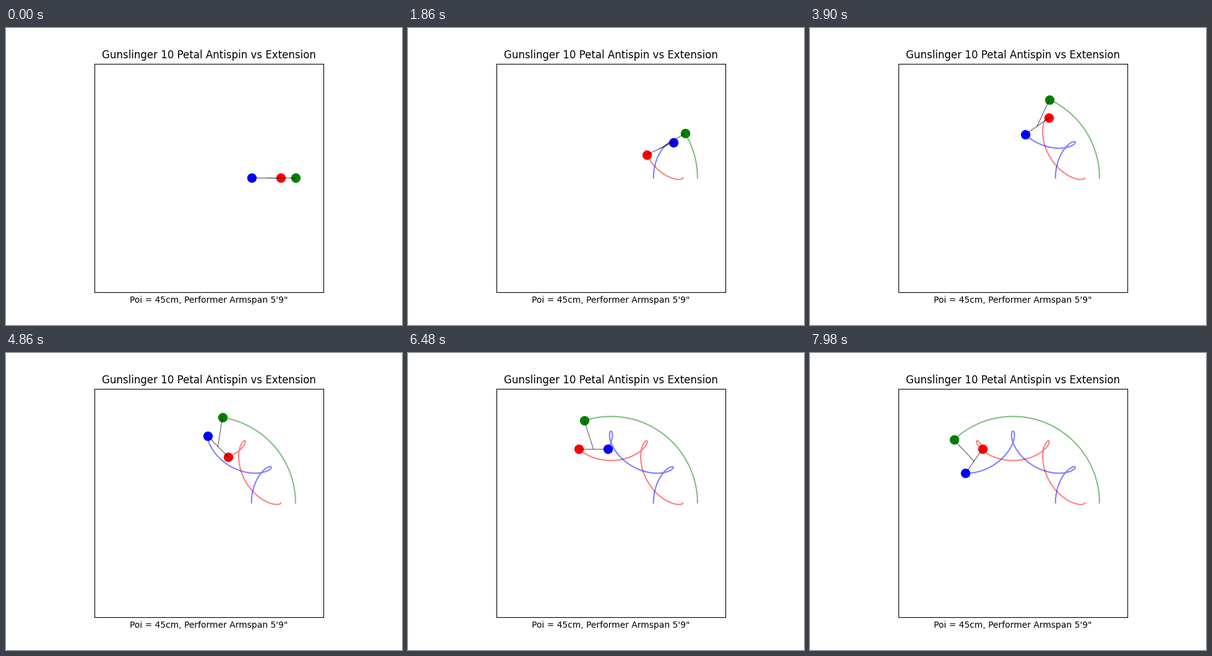
Recreate the animation shown at these times as a matplotlib script. Size 640 px wide and 480 px high, loop 8000 ms.

```python
import numpy as np
import matplotlib.pyplot as plt
from matplotlib.animation import FuncAnimation

ARM = 175.26 / 2     # cm, half of the armspan
POI = 45.0           # cm
SPIN = -5            # turns of the gunslinger poi per turn of the hand
TICK = 20            # ms
HOLD = 3             # ticks per degree of hand travel
LOOP = 8000          # ms

plt.rcParams["font.family"] = "DejaVu Sans"


def polar(radius, angle):
    return radius * np.array([np.cos(angle), np.sin(angle)])


angle = np.radians(np.arange(LOOP // (TICK * HOLD) + 1))
hand = polar(ARM, angle)
swing = polar(POI / 2, SPIN * angle)
paths = {
    "red": hand + swing,
    "blue": hand - swing,
    "green": polar(ARM + POI, angle),
}

fig, ax = plt.subplots(figsize=(6.4, 4.8), dpi=100)
ax.set_aspect("equal")
ax.set_xlim(-2 * ARM, 2 * ARM)
ax.set_ylim(-2 * ARM, 2 * ARM)
ax.set_xticks([])
ax.set_yticks([])
ax.set_title("Gunslinger 10 Petal Antispin vs Extension")
ax.set_xlabel("Poi = 45cm, Performer Armspan 5'9\"")

trails, heads, tethers = {}, {}, {}
for color in paths:
    trails[color], = ax.plot([], [], color=color, alpha=0.5, lw=1.5, zorder=2)
    heads[color], = ax.plot([], [], "o", color=color, ms=10, zorder=3)
    tethers[color], = ax.plot([], [], color="black", lw=0.5, zorder=4)


def update(tick):
    n = tick // HOLD
    for color, path in paths.items():
        trails[color].set_data(path[:, :n + 1])
        heads[color].set_data(path[:, n:n + 1])
        tethers[color].set_data(np.column_stack([hand[:, n], path[:, n]]))
    return [*trails.values(), *heads.values(), *tethers.values()]


anim = FuncAnimation(fig, update, frames=LOOP // TICK, interval=TICK,
                     init_func=lambda: update(0), repeat=True,
                     repeat_delay=0, blit=False)
plt.show()
```
